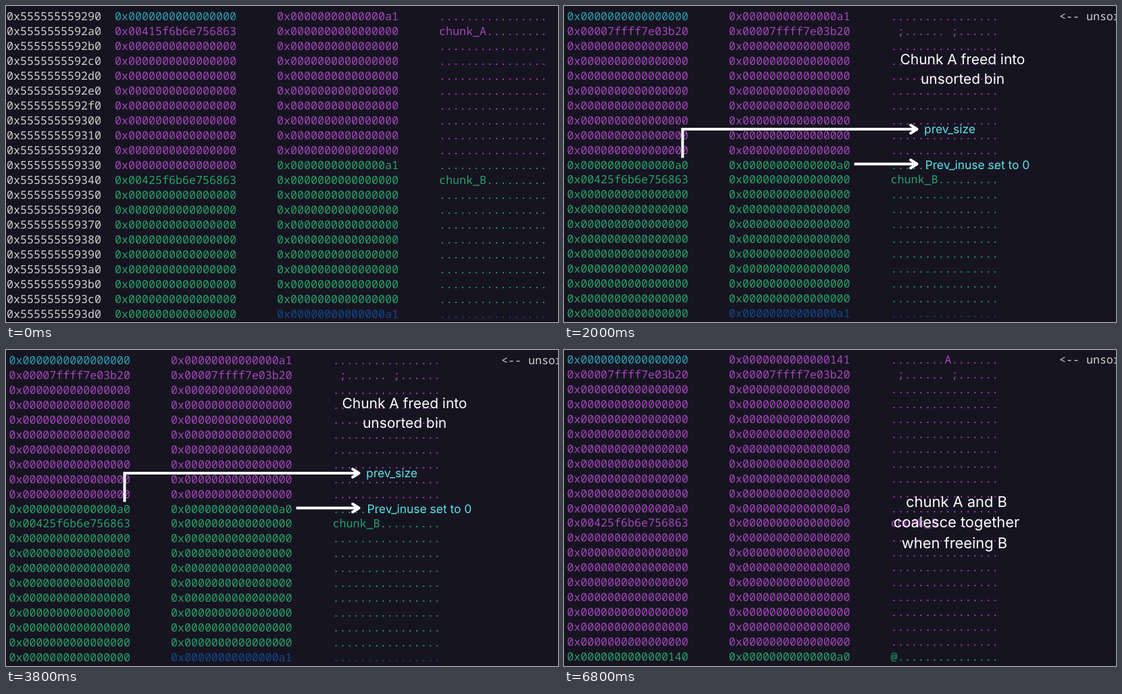
An HTML page for the animation above (8 s loop, 817 by 467 pixels).

```html
<!DOCTYPE html>
<html>
<head>
<meta charset="utf-8">
<style>
  html, body { margin: 0; width: 100%; height: 100%; overflow: hidden; background: #171421; }
  svg { display: block; }
  text { white-space: pre; text-rendering: geometricPrecision; }
  .mono { font-family: "Noto Sans Mono", monospace; }
  .note { font-family: Inter, sans-serif; }
  .arrow { fill: none; stroke: #fff; stroke-width: 4; }
  .head { stroke-linecap: round; stroke-linejoin: round; }
</style>
</head>
<body>
<svg id="stage" width="817" height="467" viewBox="0 0 817 467"></svg>
<script>
const FG = '#d0cfcc', CYAN = '#2aa1b3', MAGENTA = '#a347ba', GREEN = '#26a269', BLUE = '#12488b';
const WHITE = '#fff', AQUA = '#5ce1e6';
const ROWS = 21, LAST = ROWS - 1, SPLIT = 10;
const DOTS = '.'.repeat(16), LINKS = ' ;...... ;......';
const CHUNK_A = '415f6b6e756863', CHUNK_B = '425f6b6e756863', BIN = '7ffff7e03b20';

const stage = document.getElementById('stage');

function add(parent, tag, attrs, content = '') {
  const el = document.createElementNS('http://www.w3.org/2000/svg', tag);
  for (const key in attrs) el.setAttribute(key, attrs[key]);
  el.textContent = content;
  return parent.appendChild(el);
}

const word = value => '0x' + value.padStart(16, '0');

// Heap dump: cells maps row -> [first word, second word, ascii], colors(row) -> [first, second]
function dump({ x, y, pitch, advance, cells, colors, addresses, label }) {
  const group = add(stage, 'g', {});
  const put = (column, row, fill, content) => add(group, 'text', {
    class: 'mono', x: x + column * advance, y: y + row * pitch, fill, 'font-size': advance / 0.6
  }, content);
  for (let row = 0; row < ROWS; row++) {
    const [first = '', second = '', ascii = DOTS] = cells[row] || [];
    const [firstColor, secondColor] = colors(row);
    if (addresses) put(-16, row, FG, '0x' + (0x555555559290 + row * 16).toString(16));
    put(0, row, firstColor, word(first));
    put(24, row, secondColor, word(second));
    put(48, row, secondColor, ascii);
  }
  if (label) put(73, 0, FG, label);
  return group;
}

function note(group, x, y, size, fill, anchor, content) {
  add(group, 'text', { class: 'note', x, y, fill, 'font-size': size, 'text-anchor': anchor }, content);
}

function arrow(group, path, y) {
  add(group, 'path', { class: 'arrow', d: `${path} H522` });
  add(group, 'path', { class: 'arrow head', d: `M513 ${y - 6} L522.5 ${y} L513 ${y + 6}` });
}

const firstWord = (row, split) =>
  row === 0 ? CYAN : row < split ? MAGENTA : GREEN;
const secondWord = row =>
  row < SPLIT ? MAGENTA : row < LAST ? GREEN : BLUE;

const allocated = dump({
  x: 161, y: 21, pitch: 22, advance: 10, addresses: true,
  cells: {
    0: ['', 'a1'],
    1: [CHUNK_A, '', 'chunk_A.........'],
    10: ['', 'a1'],
    11: [CHUNK_B, '', 'chunk_B.........'],
    20: ['', 'a1']
  },
  colors: row => [firstWord(row, SPLIT + 1), secondWord(row)]
});
add(allocated, 'rect', { y: 465.5, width: 817, height: 1.5, fill: '#08070c' });

const freed = dump({
  x: 4.5, y: 21, pitch: 21.95, advance: 9.98, label: '<-- unsortedbin',
  cells: {
    0: ['', 'a1'],
    1: [BIN, BIN, LINKS],
    10: ['a0', 'a0'],
    11: [CHUNK_B, '', 'chunk_B.........'],
    20: ['', 'a1']
  },
  colors: row => [firstWord(row, SPLIT), secondWord(row)]
});
note(freed, 590, 86, 20.9, WHITE, 'middle', 'Chunk A freed into');
note(freed, 590, 115, 20.9, WHITE, 'middle', 'unsorted bin');
note(freed, 533, 188, 17.4, AQUA, 'start', 'prev_size');
note(freed, 534.5, 241, 17.4, AQUA, 'start', 'Prev_inuse set to 0');
arrow(freed, 'M175.5 224.5 V182', 182);
arrow(freed, 'M429.5 233.5', 233.5);

const merged = dump({
  x: 4.5, y: 20, pitch: 21.95, advance: 9.98, label: '<-- unsortedbin',
  cells: {
    0: ['', '141', '........A.......'],
    1: [BIN, BIN, LINKS],
    10: ['a0', 'a0'],
    11: [CHUNK_B, '', 'chunk_B.........'],
    20: ['140', 'a0', '@...............']
  },
  colors: row => [firstWord(row, LAST), row < LAST ? MAGENTA : GREEN]
});
['chunk A and B', 'coalesce together', 'when freeing B'].forEach((line, i) =>
  note(merged, i < 2 ? 581 : 578, 231.5 + i * 30.5, 21.9, WHITE, 'middle', line));

const scenes = [[allocated, 0, 2000], [freed, 2000, 5000], [merged, 5000, 8000]];

function draw(now) {
  const time = now % 8000;
  for (const [group, from, to] of scenes)
    group.style.display = time >= from && time < to ? '' : 'none';
  requestAnimationFrame(draw);
}
draw(0);
</script>
</body>
</html>
```
